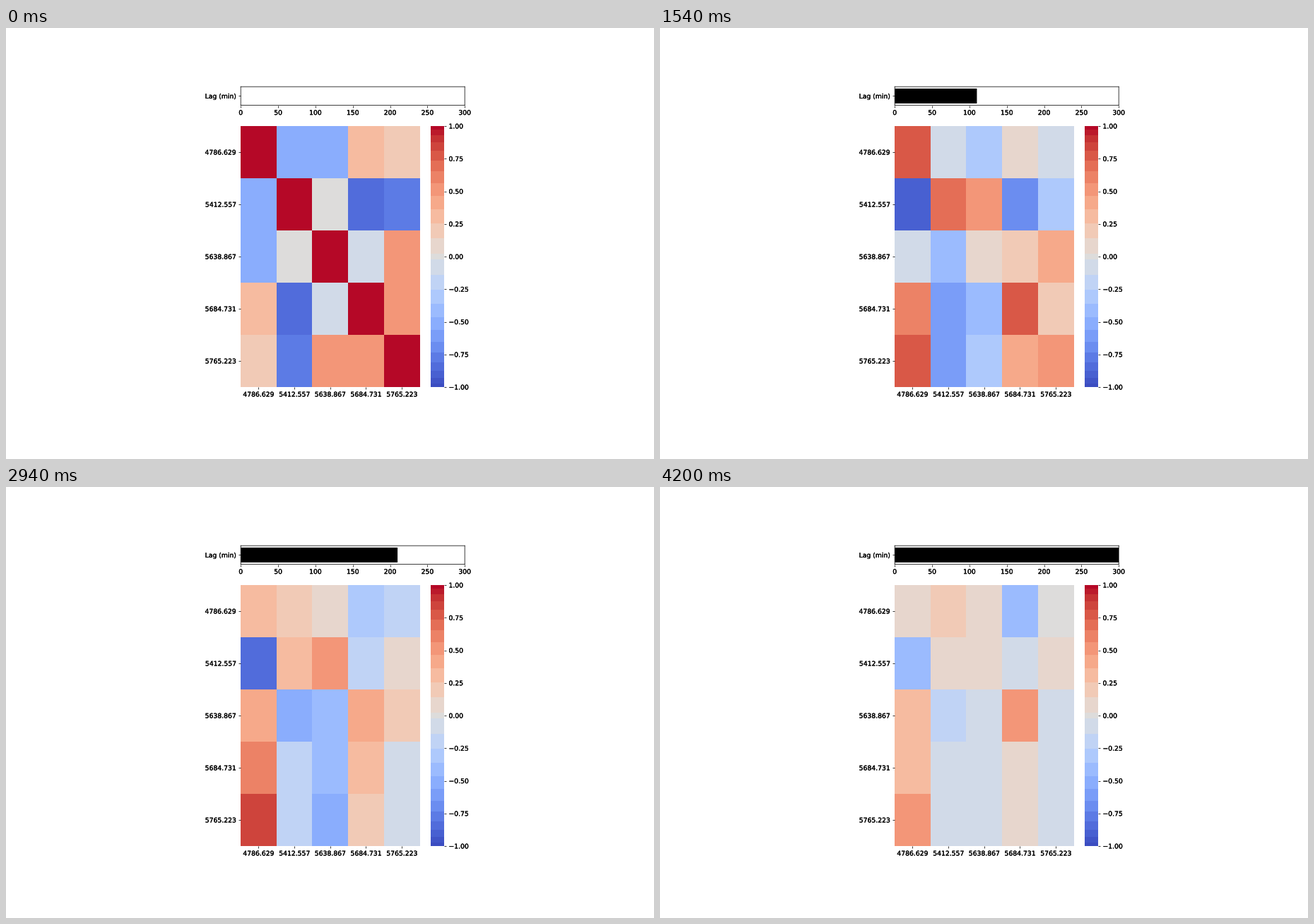
These frames come from a looping animation (917x611 px, 4270 ms). A matplotlib script:

```python
import numpy as np
import matplotlib.pyplot as plt
from matplotlib.animation import FuncAnimation
from matplotlib.colors import BoundaryNorm, ListedColormap
from matplotlib.patheffects import withStroke

W, H, DPI = 917, 611, 64
FRAMES, INTERVAL = 61, 70
LAG_STEP, LAG_MAX = 5, 300
NAMES = ["4786.629", "5412.557", "5638.867", "5684.731", "5765.223"]
LINE, TICK = .85, 3.65

plt.rcParams.update({
    "font.family": "DejaVu Sans",
    "font.size": 10.4,
    "axes.linewidth": LINE,
})

# Diverging scale in bands that narrow towards both ends
ramp = .02 + .98 * (1 - np.linspace(1, 0, 13) ** 1.5)
EDGES = np.concatenate([-ramp[::-1], ramp])
MIDS = (EDGES[:-1] + EDGES[1:]) / 2
CMAP = ListedColormap(plt.get_cmap("coolwarm")((MIDS + 1) / 2))
STYLE = dict(cmap=CMAP, norm=BoundaryNorm(EDGES, CMAP.N),
             aspect="auto", interpolation="nearest")

# Zero lag: a symmetric matrix with a unit diagonal
upper = np.zeros((5, 5))
upper[np.triu_indices(5, 1)] = [
    -.55, -.55, .31, .2, .01, -.86, -.78, -.07, .5, .5]
START = upper + upper.T + np.eye(5)

# Two row patterns shape both the final state and the swing on the way there
P = [.05, -.44, .3, .34, .52]
Q = [.3, 0, -.35, 0, 0]
END = np.outer(P, [1, -.2, -.2, .1, -.1]) + np.outer(Q, [0, .55, .2, -1.3, 0])
SWING = np.outer(P, [1, 0, -1.25, .1, -.45]) + np.outer(Q, [0, 1, .6, -.2, -.7])


def corr_at(lag):
    angle = np.pi * lag / LAG_MAX
    ease = (1 - np.cos(angle)) / 2
    return np.clip(START + (END - START) * ease + SWING * np.sin(angle), -1, 1)


fig = plt.figure(figsize=(W / DPI, H / DPI), dpi=DPI, facecolor="white")


def add_axes(left, top, right, bottom, frame=False):
    ax = fig.add_axes([left / W, 1 - bottom / H,
                       (right - left) / W, (bottom - top) / H])
    for spine in ax.spines.values():
        spine.set(visible=frame, snap=False)
    ax.tick_params(length=TICK, pad=TICK, width=LINE)
    return ax


lag_ax = add_axes(332.2, 83.2, 649.2, 109.6, frame=True)
lag_ax.set(xlim=(0, LAG_MAX), ylim=(-.5, .5), xticks=range(0, LAG_MAX + 1, 50))
lag_ax.set_yticks([0], ["Lag (min)"])
bar = lag_ax.barh(0, 0, height=.8, color="black", snap=False)[0]

heat_ax = add_axes(332, 139, 585.5, 509)
cells = heat_ax.imshow(START, **STYLE)
heat_ax.set_xticks(range(5), NAMES)
heat_ax.set_yticks(range(5), NAMES)

scale_ax = add_axes(601, 139, 620, 509)
scale_ax.imshow(np.linspace(1, -1, 370)[:, None], extent=(0, 1, -1, 1), **STYLE)
scale_ax.set_xticks([])
scale_ax.yaxis.tick_right()
ticks = np.linspace(-1, 1, 9)
scale_ax.set_yticks(ticks, [f"{t:.2f}".replace("-", "\u2212") for t in ticks])

# Slightly heavier lettering
for ax in fig.axes:
    for label in ax.get_xticklabels() + ax.get_yticklabels():
        label.set_path_effects([withStroke(linewidth=.3, foreground="black")])


def update(frame):
    lag = frame * LAG_STEP
    bar.set_width(lag)
    cells.set_data(corr_at(lag))
    return bar, cells


anim = FuncAnimation(fig, update, frames=FRAMES, interval=INTERVAL,
                     repeat=True, repeat_delay=0)
plt.show()
```
